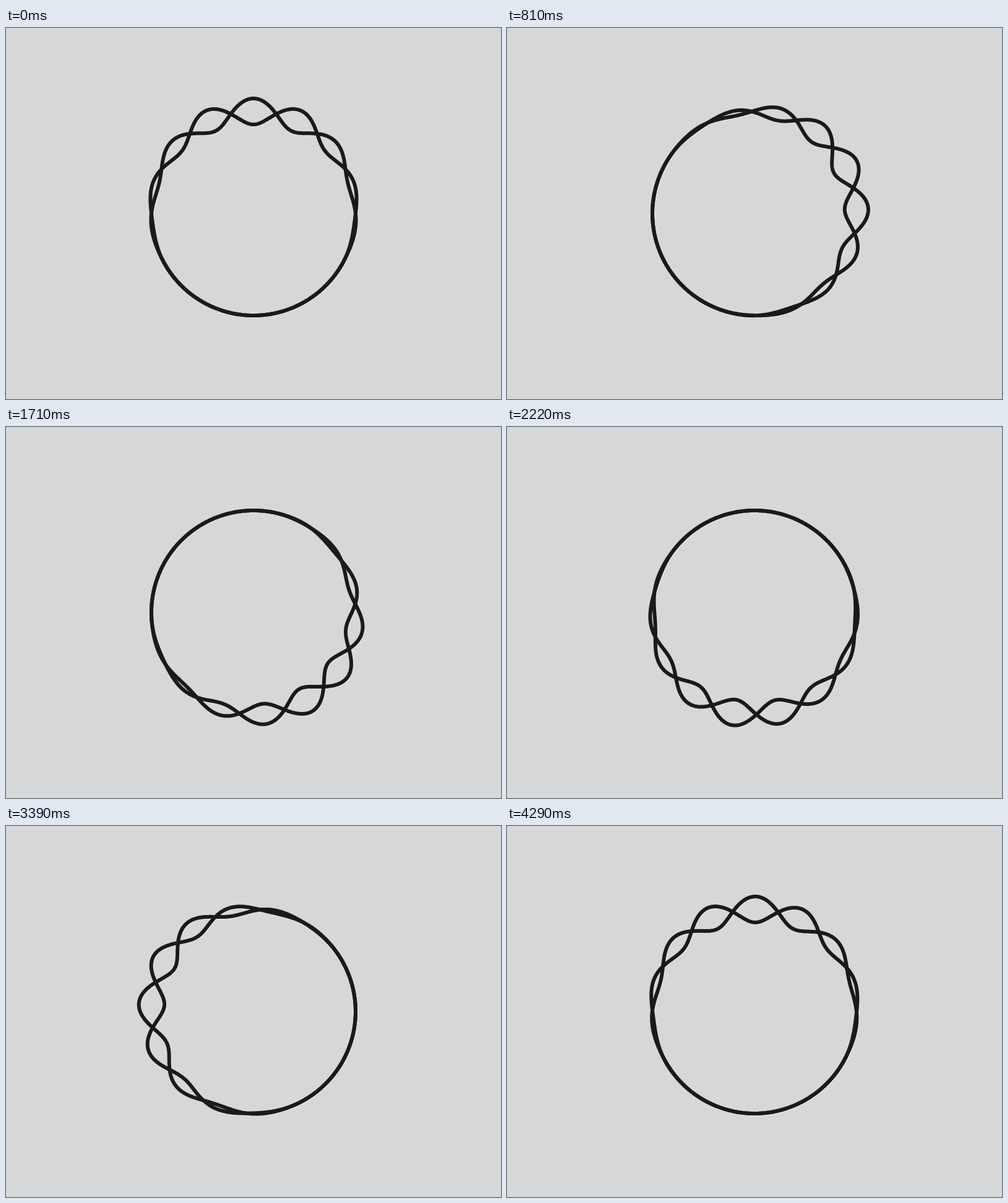
An HTML page with a canvas that plays this animation: 800x600 px, repeating every 4.32 s.

```html
<!DOCTYPE html>
<html>
<head>
<meta charset="utf-8">
<title>Braided ring</title>
<style>
html, body { margin: 0; width: 100%; height: 100%; overflow: hidden; background: #d6d7d8; }
canvas { display: block; }
</style>
</head>
<body>
<canvas id="stage" width="800" height="600"></canvas>
<script>
const ctx = document.getElementById('stage').getContext('2d');
const LOOP = 4320, STEP = 30, RADIUS = 165, SWELL = 21, WAVES = 7;
const TAU = 2 * Math.PI, POINTS = 720;

// Closed strand; the angle runs clockwise from the top.
function strand(p, side) {
  const path = new Path2D();
  for (let i = 0; i < POINTS; i++) {
    const a = TAU * i / POINTS;
    const envelope = ((1 + Math.cos(a - TAU * p)) / 2) ** 3;
    const r = RADIUS + side * SWELL * envelope * Math.cos(WAVES * a + 3 * Math.PI * p);
    path.lineTo(400 + r * Math.sin(a), 300 - r * Math.cos(a));
  }
  path.closePath();
  return path;
}

function strokeAll(paths, color, offset) {
  ctx.save();
  ctx.translate(offset, offset);
  ctx.strokeStyle = color;
  for (const path of paths) ctx.stroke(path);
  ctx.restore();
}

function draw(now) {
  const p = Math.floor(now % LOOP / STEP) * STEP / LOOP;
  const paths = [strand(p, 1), strand(p, -1)];
  ctx.fillStyle = '#d6d7d8';
  ctx.fillRect(0, 0, 800, 600);
  ctx.lineWidth = 6;
  ctx.lineJoin = 'round';
  strokeAll(paths, '#dedfe0', 1.5);
  strokeAll(paths, '#1a1a1b', 0);
}

const start = performance.now();
function tick() {
  draw(performance.now() - start);
  requestAnimationFrame(tick);
}
tick();
</script>
</body>
</html>
```
